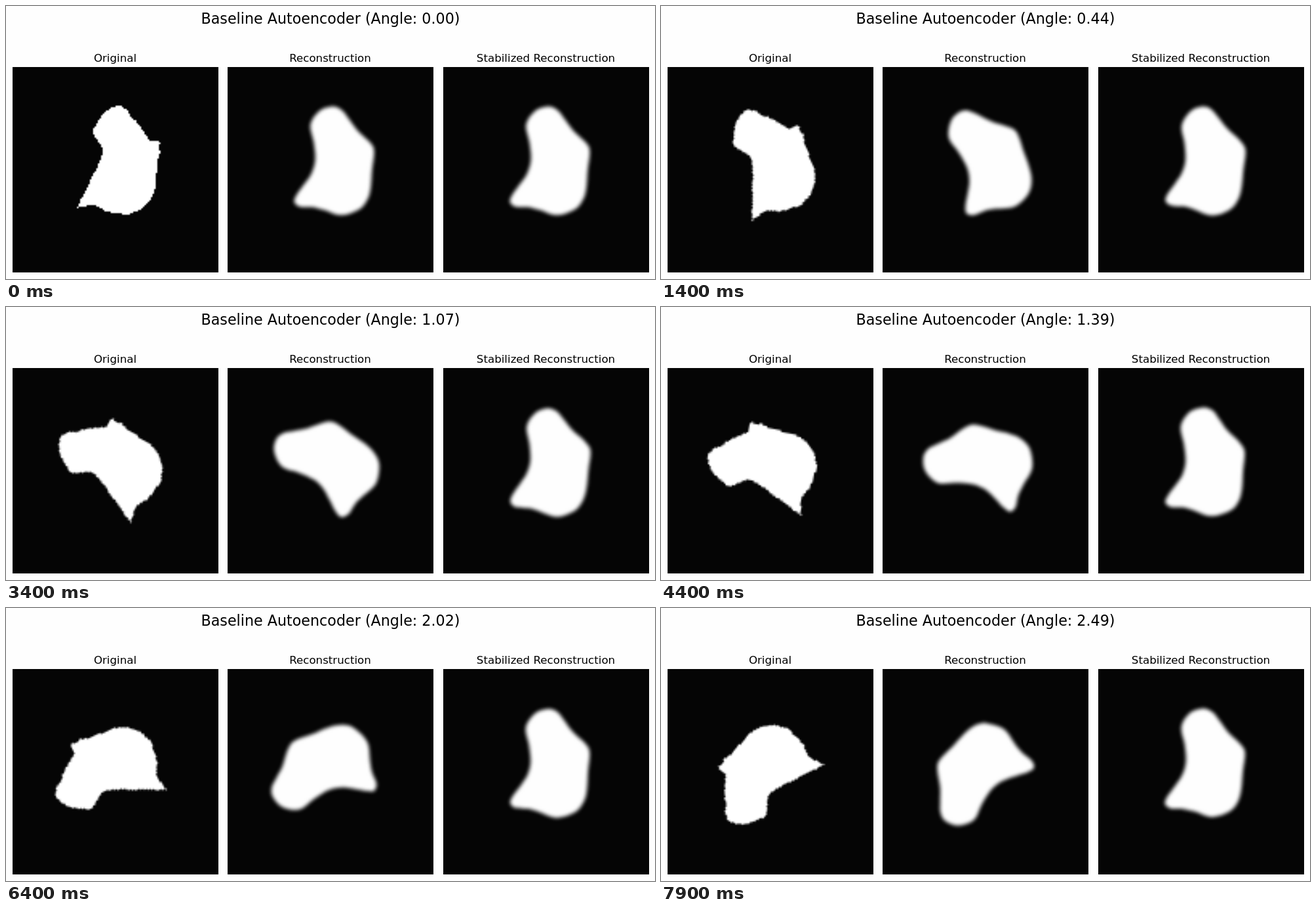
An HTML page with a canvas that plays this animation: 990x416 px, repeating every 8 s.

```html
<!DOCTYPE html>
<html lang="en">
<head>
<meta charset="utf-8">
<title>Baseline Autoencoder</title>
<style>
  html, body { margin: 0; width: 100%; height: 100%; overflow: hidden; background: #fefefe; }
  canvas { display: block; }
</style>
</head>
<body>
<canvas id="stage" width="990" height="416"></canvas>
<script>
const ctx = document.getElementById('stage').getContext('2d');
const N = 128, W = 314, H = 313, TOP = 93;
const STEPS = 80, STEP_MS = 100, TURN = 2 * Math.PI / 199;
const PAPER = '#fefefe', DARK = '#050505';

function grid() {
  const c = document.createElement('canvas');
  c.width = c.height = N;
  return c.getContext('2d', { willReadFrequently: true });
}

function seeded(seed) {
  return () => (seed = seed * 16807 % 2147483647) / 2147483647;
}

// Key points are stage pixels; the grid has its origin at the panel centre.
const toGrid = (points, cx, cy = 249.5) =>
  points.map(([x, y]) => [(x - cx) * N / 313.5, (y - cy) * N / 313.5]);

const silhouette = toGrid([
  [175, 151], [187, 161], [191, 170], [200, 177], [219, 206], [221, 205],
  [234, 205], [234, 228], [231, 232], [228, 278], [222, 292], [205, 311],
  [183, 318.5], [157, 314], [135, 303.5], [108, 308], [119, 287], [136, 252],
  [145, 232], [147, 216], [133, 195], [134, 186], [147, 164], [160, 155]
], 167);

const outline = toGrid([
  [827.5, 153], [841, 158.5], [851, 171], [864, 188], [884, 207], [891, 221],
  [888, 250], [886, 275], [881, 294], [868, 310], [840, 319], [813, 310.5],
  [796, 306], [778, 305], [769.5, 298], [773, 287], [785, 270], [795, 254],
  [800, 234], [798, 208], [793.5, 181], [808, 159.5]
], 824);

// Adds small random steps along each edge, keeping the corners.
function roughen(points, amount) {
  const rand = seeded(7);
  const jitter = () => (rand() - 0.5) * 2 * amount;
  return points.flatMap((p, i) => {
    const q = points[(i + 1) % points.length];
    const parts = Math.ceil(Math.hypot(q[0] - p[0], q[1] - p[1]) / 2);
    return Array.from({ length: parts }, (_, k) => k === 0 ? p : [
      p[0] + (q[0] - p[0]) * k / parts + jitter(),
      p[1] + (q[1] - p[1]) * k / parts + jitter()
    ]);
  });
}

// The silhouette as hard cells.
function makeMask() {
  const g = grid();
  g.translate(N / 2, N / 2);
  g.fillStyle = '#fff';
  g.beginPath();
  roughen(silhouette, 0.4).forEach(p => g.lineTo(...p));
  g.fill();
  const cells = g.getImageData(0, 0, N, N);
  for (let i = 0; i < cells.data.length; i += 4) {
    cells.data.fill(cells.data[i + 3] > 127 ? 255 : 0, i, i + 4);
  }
  g.putImageData(cells, 0, 0);
  return g.canvas;
}

// The decoded outline breathes slightly as the angle changes.
function breathe(step) {
  return outline.map(([x, y], i) => [
    x + 0.3 * Math.sin(step * 0.31 + i * 0.8),
    y + 0.3 * Math.sin(step * 0.23 + i * 0.6)
  ]);
}

function smoothPath(g, pts) {
  const n = pts.length, at = i => pts[(i + n) % n];
  g.beginPath();
  g.moveTo(...pts[0]);
  for (let i = 0; i < n; i++) {
    const [p, q, r, s] = [at(i - 1), at(i), at(i + 1), at(i + 2)];
    g.bezierCurveTo(
      q[0] + (r[0] - p[0]) / 6, q[1] + (r[1] - p[1]) / 6,
      r[0] - (s[0] - q[0]) / 6, r[1] - (s[1] - q[1]) / 6,
      r[0], r[1]);
  }
  g.closePath();
}

const mask = makeMask();
const cell = grid();

function label(text, x, y, size) {
  ctx.font = `${size}px "DejaVu Sans", sans-serif`;
  ctx.textAlign = 'center';
  ctx.fillStyle = '#000';
  ctx.fillText(text, x, y);
}

function panel(left, title, angle, paint) {
  cell.resetTransform();
  cell.filter = 'none';
  cell.fillStyle = DARK;
  cell.fillRect(0, 0, N, N);
  cell.translate(N / 2, N / 2);
  cell.rotate(-angle);
  cell.fillStyle = PAPER;
  paint(cell);
  ctx.drawImage(cell.canvas, left, TOP, W, H);
  label(title, left + 156.5, 85, 16.67);
}

function draw(step) {
  const angle = step * TURN;
  const points = breathe(step);
  const ragged = g => g.drawImage(mask, -N / 2, -N / 2);
  const soft = g => {
    g.filter = 'blur(0.9px)';
    smoothPath(g, points);
    g.fill();
  };
  ctx.fillStyle = PAPER;
  ctx.fillRect(0, 0, 990, 416);
  label(`Baseline Autoencoder (Angle: ${angle.toFixed(2)})`, 495, 27, 22.22);
  panel(10, 'Original', angle, ragged);
  panel(338, 'Reconstruction', angle, soft);
  panel(667, 'Stabilized Reconstruction', 0, soft);
}

const start = performance.now();
let shown = -1;
function tick() {
  const step = Math.floor((performance.now() - start) / STEP_MS) % STEPS;
  if (step !== shown) draw(shown = step);
  requestAnimationFrame(tick);
}
tick();
</script>
</body>
</html>
```
